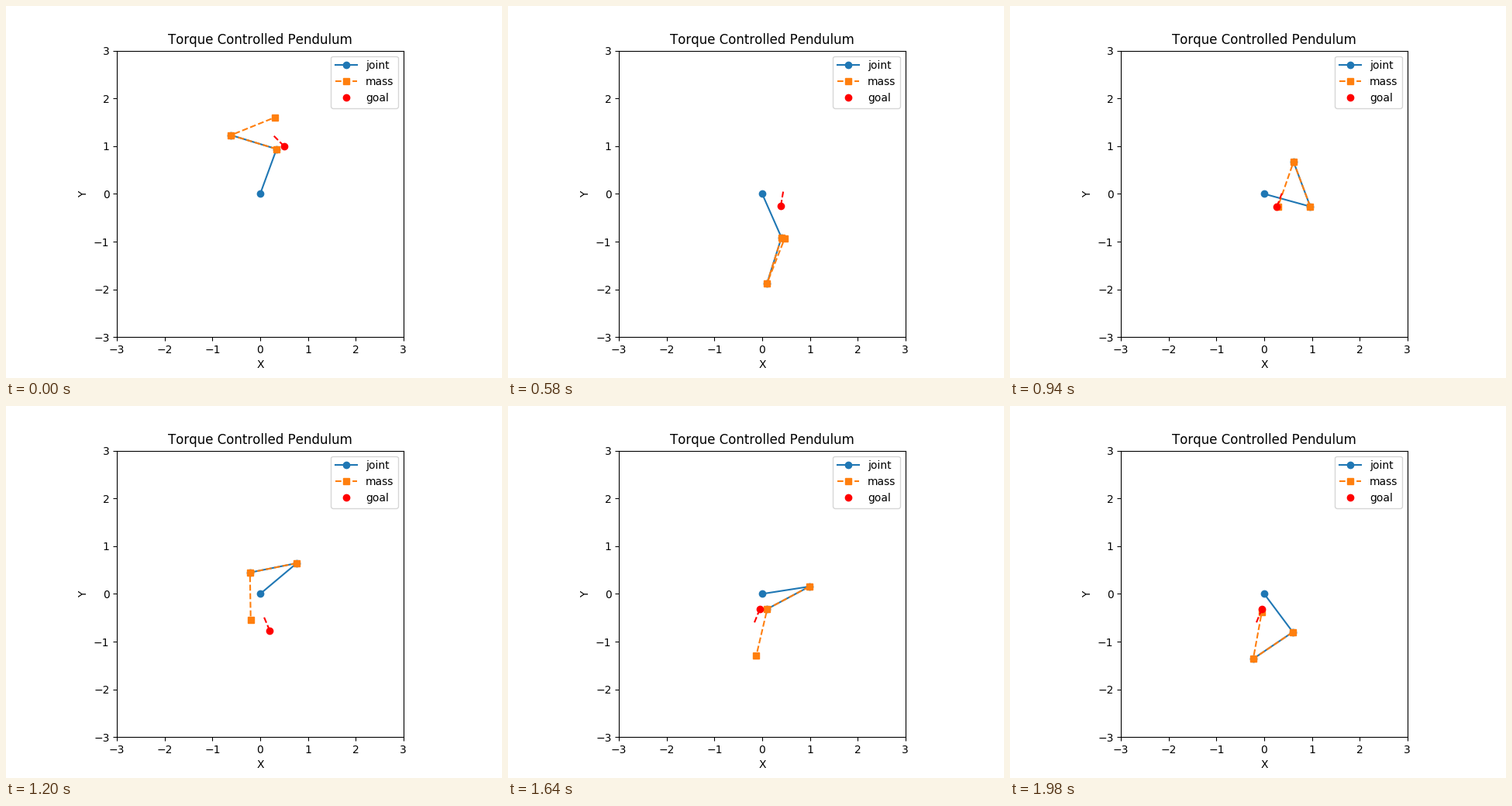
These frames come from a looping animation (640 by 480 pixels, 2 s). A matplotlib script:

```python
import numpy as np
import matplotlib.pyplot as plt
from matplotlib.animation import FuncAnimation

FRAMES, INTERVAL = 100, 20
APPROACH = 0.3

# start frame: goal x, y and heading of its approach line (degrees)
GOALS = {
    0: (0.5, 1.0, 135),
    18: (0.39, -0.25, 80.5),
    41: (0.265, -0.27, 69.5),
    48: (0.2, -0.77, 113),
    67: (-0.05, -0.32, 248),
}

# joint angles on the way to each goal (degrees, each relative to the last link)
SWINGS = {
    0: (69.9, 93.2, -141.1),
    14: (72.1, 63.2, -173.4),
    29: (-66.2, -41.3, -184.0),
    60: (40.0, 151.3, -280.4),
    82: (8.8, 199.2, -311.2),
    99: (-53.2, 267.2, -494.4),
}


def unit(deg):
    r = np.radians(deg)
    return np.stack([np.cos(r), np.sin(r)], axis=-1)


def reach(x, y, heading):
    """Joint angles that put the tip on a goal, last link along its heading."""
    wx, wy = (x, y) + unit(heading)
    middle = np.degrees(np.arctan2(wy, wx))
    spread = np.degrees(np.arccos(np.hypot(wx, wy) / 2))
    first, second = middle - spread, middle + spread
    return np.array([first, second - first, heading + 180 - second])


def build_path():
    """Each goal is reached on the frame where the next one appears."""
    path = {f: np.array(pose) for f, pose in SWINGS.items()}
    starts = list(GOALS)
    for start, end in zip(starts, starts[1:]):
        pose = reach(*GOALS[start])
        before = path[max(f for f in path if f < end)]
        path[end] = pose + 360 * np.round((before - pose) / 360)
    times = sorted(path)
    return np.array(times), np.array([path[t] for t in times])


def monotone_slopes(t, y):
    """Slopes that are zero at turning points, so the curve never overshoots."""
    d = np.diff(y, axis=0) / np.diff(t)[:, None]
    a, b = d[:-1], d[1:]
    same = a * b > 0
    slopes = np.zeros_like(y)
    slopes[1:-1] = np.where(same, 2 * a * b / np.where(same, a + b, 1), 0)
    return slopes


TIMES, JOINTS = build_path()
SLOPES = monotone_slopes(TIMES, JOINTS)


def joints_at(f):
    k = min(np.searchsorted(TIMES, f, side="right") - 1, len(TIMES) - 2)
    h = TIMES[k + 1] - TIMES[k]
    u = (f - TIMES[k]) / h
    return ((1 + 2 * u) * (1 - u) ** 2 * JOINTS[k]
            + u * (1 - u) ** 2 * h * SLOPES[k]
            + u * u * (3 - 2 * u) * JOINTS[k + 1]
            + u * u * (u - 1) * h * SLOPES[k + 1])


plt.rcParams["text.kerning_factor"] = 6
fig, ax = plt.subplots(figsize=(6.4, 4.8), dpi=100)
ax.set_aspect("equal")
ax.set(xlim=(-3, 3), ylim=(-3, 3), xticks=range(-3, 4), yticks=range(-3, 4),
       xlabel="X", ylabel="Y", title="Torque Controlled Pendulum")

joint, = ax.plot([], [], "o-", color="C0", label="joint")
mass, = ax.plot([], [], "s--", color="C1", label="mass")
goal, = ax.plot([], [], "ro", label="goal")
approach, = ax.plot([], [], "r--")
ax.legend(loc="upper right")


def update(f):
    links = unit(np.cumsum(joints_at(f)))
    points = np.vstack([(0, 0), np.cumsum(links, axis=0)])
    joint.set_data(*points[:3].T)
    mass.set_data(*points[1:].T)

    x, y, heading = GOALS[max(start for start in GOALS if start <= f)]
    dx, dy = APPROACH * unit(heading)
    goal.set_data([x], [y])
    approach.set_data([x, x + dx], [y, y + dy])
    return joint, mass, goal, approach


anim = FuncAnimation(fig, update, frames=FRAMES, interval=INTERVAL,
                     repeat=True, repeat_delay=0)
plt.show()
```
